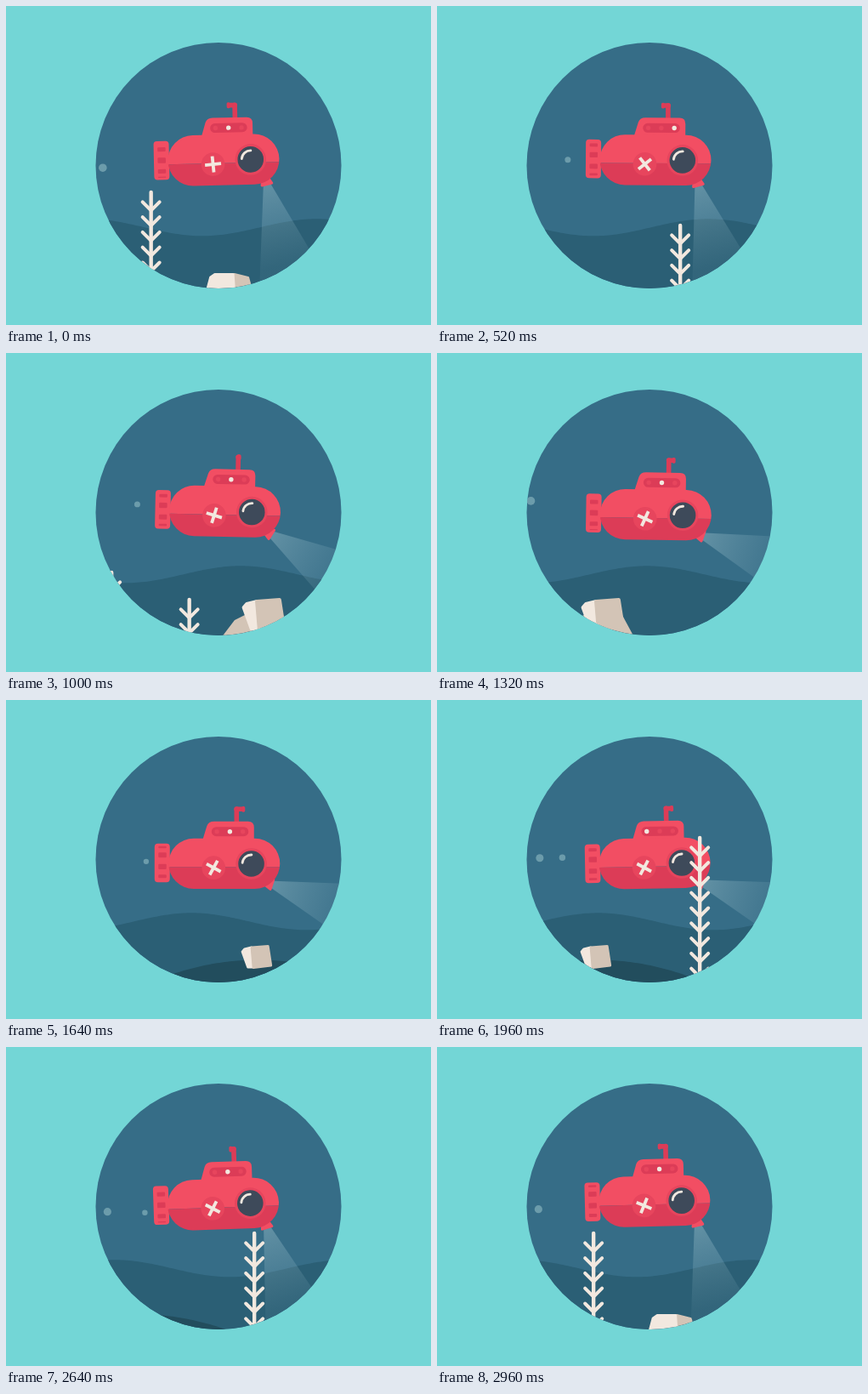
Write an HTML page with a canvas that moves like this. It is 500x375 px and loops after 3000 ms.

```html
<!DOCTYPE html>
<html lang="en">
<head>
<meta charset="utf-8">
<title>Submarine</title>
<style>
html, body { margin: 0; width: 100%; height: 100%; overflow: hidden; background: #73d6d6; }
canvas { display: block; }
</style>
</head>
<body>
<canvas id="stage" width="500" height="375"></canvas>
<script>
const c = document.getElementById('stage').getContext('2d');
const LOOP = 3000, TAU = Math.PI * 2, RAD = Math.PI / 180;
const SPEED = 0.3375, WORLD = SPEED * LOOP;
const RED = '#f24e63', MID_RED = '#e7455d', DARK_RED = '#dc3c57';
const CREAM = '#f2e8df', TAN = '#d3c4b6';

const smooth = (t, from, to) => {
  const u = Math.min(1, Math.max(0, (t - from) / (to - from)));
  return u * u * (3 - 2 * u);
};

function disc(x, y, r, color) {
  c.fillStyle = color;
  c.beginPath();
  c.arc(x, y, r, 0, TAU);
  c.fill();
}

function box(x, y, w, h, r, color) {
  c.fillStyle = color;
  c.beginPath();
  c.roundRect(x, y, w, h, r);
  c.fill();
}

function line(points, width, color, cap = 'round') {
  c.beginPath();
  points.forEach(([x, y]) => c.lineTo(x, y));
  c.lineWidth = width;
  c.lineCap = cap;
  c.lineJoin = 'round';
  c.strokeStyle = color;
  c.stroke();
}

// Polygon with softened corners
function stone(color, ...points) {
  line([...points, points[0]], 3, color);
  c.fillStyle = color;
  c.fill();
}

// Ground below the curve y = height(x)
function ground(color, from, to, height) {
  c.fillStyle = color;
  c.beginPath();
  c.moveTo(from, 400);
  for (let x = from; x <= to; x += 3) c.lineTo(x, height(x));
  c.lineTo(to, 400);
  c.fill();
}

function drawBubbles(t) {
  [331, 815, 1531, 1724, 2200, 2520].forEach((born, i) => {
    const age = (t - born + LOOP) % LOOP;
    const y = 183.2 + 4 * i - 7 * (i % 2);
    if (age < 620) disc(180 - 0.1375 * age, y - 0.0125 * age, 2.7 + 0.0043 * age, 'rgba(190,225,225,.4)');
  });
}

function lamp(t) {
  const turn = smooth(t, 420, 1250) - smooth(t, 1900, 2750);
  c.save();
  c.translate(305.5, 214);
  c.rotate((77 - 58.5 * turn) * RAD);
  const glow = c.createLinearGradient(8, 0, 105, 0);
  glow.addColorStop(0, 'rgba(190,220,225,.32)');
  glow.addColorStop(1, 'rgba(150,190,205,.07)');
  c.fillStyle = glow;
  c.beginPath();
  c.moveTo(9, -4.5);
  c.lineTo(209, -63.5);
  c.lineTo(209, 63.5);
  c.lineTo(9, 4.5);
  c.fill();
  stone(RED, [0, -3], [8, -6], [8, 6], [0, 3]);
  c.restore();
}

// Slots roll around a drum seen from the side
function propeller(t) {
  const gap = 40, shift = (t * 25 / LOOP % 1) * gap;
  box(175, 168.5, 18, 45.5, 4, RED);
  for (let a = -gap; a < 90 + gap; a += gap) {
    const h = 6.5 * Math.cos((a - shift) * RAD);
    if (h > 1) box(179.5, 191.2 + 20 * Math.sin((a - shift) * RAD) - h / 2, 9.5, h, 1, DARK_RED);
  }
}

function periscope(t) {
  const s = -Math.cos((t - 180) / LOOP * TAU);
  line([[271.5, 144], [271.5, 128], [271.5 + 7 * s, 128]], 5.6, DARK_RED, 'butt');
  disc(271.5, 128, 3, DARK_RED);
  box(269.5 + 8 * s, 124.7, 4, 6.8, 1.7, DARK_RED);
}

function cabin(t) {
  c.fillStyle = RED;
  c.beginPath();
  c.moveTo(231, 166);
  c.lineTo(236.5, 148);
  c.quadraticCurveTo(238.5, 142.5, 245, 142.5);
  c.lineTo(285, 142.5);
  c.quadraticCurveTo(292, 142.5, 292, 149.5);
  c.lineTo(292, 166);
  c.fill();
  box(242, 149, 43.5, 11, 5.5, DARK_RED);
  const lit = [1, 2, 1, 0][Math.floor((t + 550) / 750) % 4];
  for (let i = 0; i < 3; i++) {
    disc(248.3 + 15.3 * i, 154.5, 2.7, i === lit ? CREAM : MID_RED);
  }
}

function hull() {
  c.save();
  c.beginPath();
  c.roundRect(191.5, 162.5, 131, 59.3, 29.6);
  c.clip();
  box(190, 160, 140, 36, 0, RED);
  box(190, 196, 140, 30, 0, DARK_RED);
  c.restore();
}

function wheel(t) {
  disc(244.5, 197, 13.8, MID_RED);
  c.save();
  c.translate(244.5, 197);
  c.rotate((4 + 0.283 * t - 11 * Math.cos((t - 300) / LOOP * TAU)) * RAD);
  line([[-9.5, 0], [9.5, 0]], 3.8, CREAM, 'butt');
  line([[0, -9.5], [0, 9.5]], 3.8, CREAM, 'butt');
  c.restore();
}

function porthole() {
  disc(288.8, 192.3, 18.3, MID_RED);
  disc(288.8, 192.3, 15.3, '#3e4a5a');
  c.beginPath();
  c.arc(288.8, 192.3, 10.5, 186 * RAD, 272 * RAD);
  c.lineWidth = 2.8;
  c.lineCap = 'round';
  c.strokeStyle = CREAM;
  c.stroke();
}

function submarine(t) {
  const a = (t - 270) / LOOP * TAU;
  c.save();
  c.translate(249.5 + Math.sin(a), 186.2 - 6.2 * Math.cos(a));
  c.rotate((1.6 * Math.sin(a) - 0.4) * RAD);
  c.translate(-250, -192);
  lamp(t);
  propeller(t);
  periscope(t);
  cabin(t);
  hull();
  wheel(t);
  porthole();
  c.restore();
}

function plant(x, top) {
  line([[x, top + 2], [x, 345]], 4.4, CREAM);
  for (let y = top + 13.3; y < 340; y += 17.8) {
    line([[x - 10, y], [x, y + 10], [x + 10, y]], 4, CREAM);
  }
}

function boulder(x, y, scale) {
  c.save();
  c.translate(x, y);
  c.scale(scale, scale);
  stone(CREAM, [1.5, 8], [4, 5], [12, 3], [14, 26], [8, 26]);
  stone(TAN, [12.5, 3], [31.5, 1.5], [35, 24], [14.5, 26.5]);
  c.restore();
}

function foreground() {
  const hump = (x, peakX, peakY) => peakY + (x - peakX) ** 2 / 600;
  ground('#224d5d', 700, 1180, x => Math.min(hump(x, 850, 305.5), hump(x, 1046, 314)));

  plant(171, 217);
  plant(462, 256);
  plant(553.5, 288);
  plant(971, 160);

  stone(TAN, [269, 315.5], [285, 319.5], [292, 345], [269, 345]);
  stone(CREAM, [234, 345], [241, 319], [246, 315.5], [267.5, 315.5], [269.5, 345]);
  stone(TAN, [585, 345], [608, 315], [622, 308], [662, 308], [682, 345]);
  boulder(615.5, 288, 1.4);
  boulder(830.5, 288, 1);
}

function draw(t) {
  c.fillStyle = '#73d6d6';
  c.fillRect(0, 0, 500, 375);
  disc(250, 187.5, 144.5, '#366d87');
  c.save();
  c.clip();
  ground('#2b5f75', 100, 400, x => 260.3 + 10 * Math.cos((x - 231 + 0.09 * t) / 270 * TAU));
  drawBubbles(t);
  submarine(t);
  for (const copy of [0, WORLD]) {
    c.save();
    c.translate(copy - SPEED * t, 0);
    foreground();
    c.restore();
  }
  c.restore();
}

const start = performance.now();
function frame() {
  draw((performance.now() - start) % LOOP);
  requestAnimationFrame(frame);
}
frame();
</script>
</body>
</html>
```
